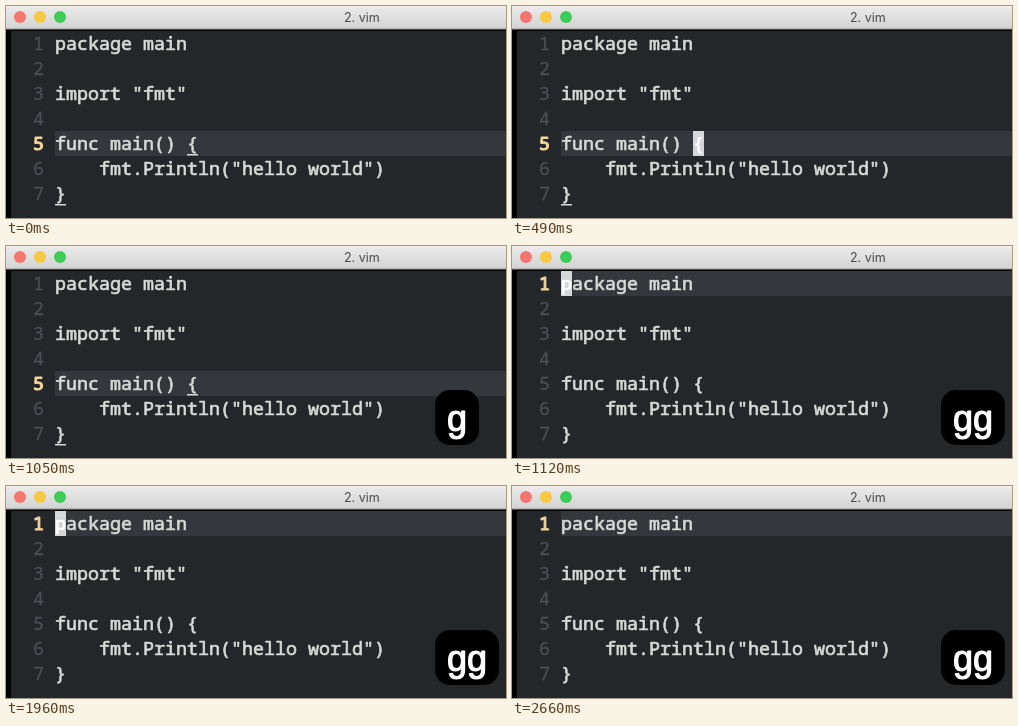
An HTML page with a canvas for the animation above (2.8 s loop, 500 px wide and 212 px high).

```html
<!DOCTYPE html>
<html lang="en">
<meta charset="utf-8">
<title>vim gg</title>
<style>
  html, body { margin: 0; width: 500px; height: 212px; overflow: hidden; background: #000; }
  canvas { display: block; }
</style>
<canvas id="stage" width="500" height="212"></canvas>
<script>
const ctx = document.getElementById('stage').getContext('2d');
const LOOP = 2800, LEFT = 49, TOP = 25, COL = 11, ROW = 25;
const FIRST_KEY = 980, JUMP = 1120;
const cursorOn = [[490, 980], [JUMP, 2100]];
const code = [
  'package main',
  '',
  'import "fmt"',
  '',
  'func main() {',
  '    fmt.Println("hello world")',
  '}'
];
ctx.lineJoin = 'round';

function rect(x, y, w, h, color) {
  ctx.fillStyle = color;
  ctx.fillRect(x, y, w, h);
}

// A thin outline in the same colour thickens the letters.
function text(str, x, y, font, color, outline = 0) {
  ctx.font = font;
  ctx.fillStyle = ctx.strokeStyle = color;
  ctx.fillText(str, x, y);
  if (outline) {
    ctx.lineWidth = outline;
    ctx.strokeText(str, x, y);
  }
}

// Puts characters on the terminal grid; negative columns are the gutter.
function cells(str, col, row, color, outline = 0.7) {
  [...str].forEach((ch, i) =>
    text(ch, LEFT + (col + i) * COL, TOP + row * ROW + 19,
      '18.33px "Noto Sans Mono", monospace', color, outline));
}

function underline(col, row) {
  rect(LEFT + col * COL, TOP + row * ROW + 23, COL, 1.5, '#d8d9d5');
}

function titleBar() {
  const shade = ctx.createLinearGradient(0, 0, 0, 22);
  shade.addColorStop(0, '#f2f2f2');
  shade.addColorStop(0.1, '#e9e9e9');
  shade.addColorStop(1, '#d3d3d3');
  rect(0, 0, 500, 22, shade);
  rect(0, 22, 500, 1, '#b4b4b4');
  rect(0, 23, 500, 1, '#505050');
  ['#f3776d', '#f7c843', '#3fcb5a'].forEach((color, i) => {
    ctx.fillStyle = color;
    ctx.beginPath();
    ctx.arc(14 + i * 20, 11, 6, 0, 7);
    ctx.fill();
  });
  text('2. vim', 338, 16, '12.5px Inter, sans-serif', '#4a4a4a');
}

function badge(keys) {
  ctx.fillStyle = '#000';
  ctx.beginPath();
  ctx.roundRect(429, 144, 24 + keys.length * 20, 55, 15);
  ctx.fill();
  text(keys, 441, 185, '36px "Liberation Sans", Arial, sans-serif', '#fff', 1.2);
}

function draw(t) {
  const jumped = t >= JUMP;
  const row = jumped ? 0 : 4, col = jumped ? 0 : 12;

  rect(0, 0, 500, 212, '#000');
  rect(5, TOP, 495, 187, '#23272a');
  rect(LEFT, TOP + row * ROW, 451, ROW, '#34373c');
  titleBar();

  code.forEach((line, i) => {
    const here = i === row;
    cells(String(i + 1), -2, i, here ? '#f4d59c' : '#4b4f53', here ? 1.2 : 0.3);
    cells(line, 0, i, '#d8d9d5');
  });

  if (!jumped) {
    underline(12, 4);
    underline(0, 6);
  }
  if (cursorOn.some(([from, to]) => t >= from && t < to)) {
    rect(LEFT + col * COL, TOP + row * ROW, COL, ROW, '#d6d7d8');
    cells(code[row][col], col, row, '#fff');
  }
  if (t >= FIRST_KEY) badge(jumped ? 'gg' : 'g');
}

const start = performance.now();
function tick() {
  draw((performance.now() - start) % LOOP);
  requestAnimationFrame(tick);
}
tick();
</script>
</html>
```
